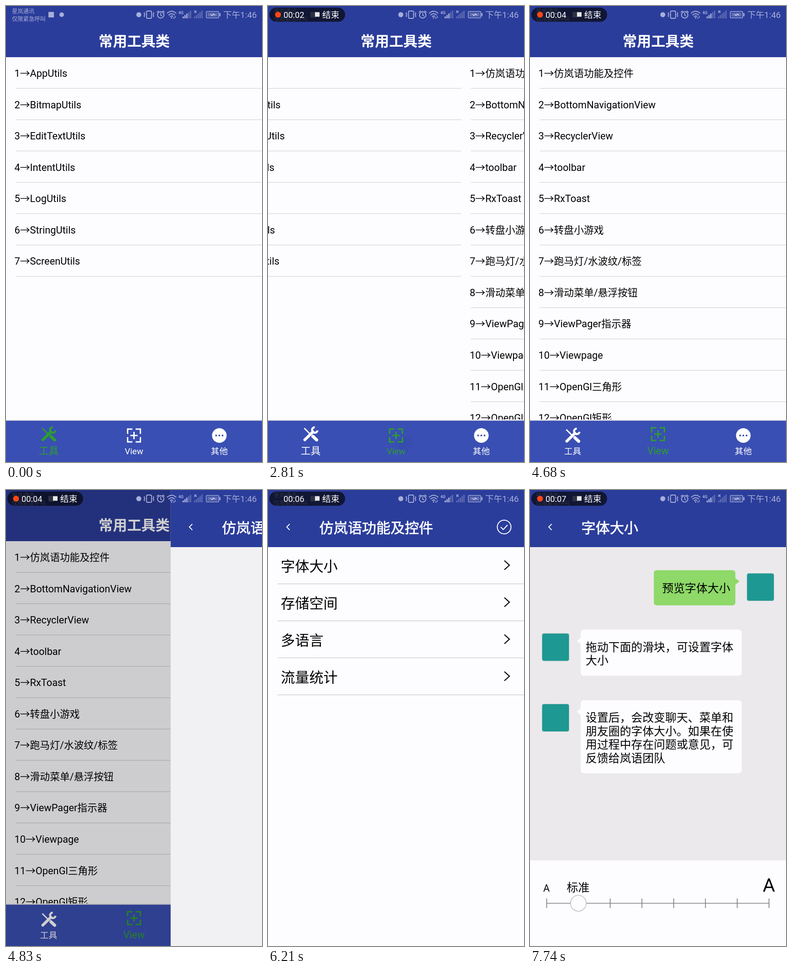
These frames come from a looping animation (561 by 998 pixels, 8 s). An HTML page:

```html
<!DOCTYPE html>
<html lang="zh-CN">
<head>
<meta charset="utf-8">
<title>常用工具类</title>
<style>
html, body { margin: 0; width: 100%; height: 100%; overflow: hidden; background: #fdfcff; }
svg { display: block; width: 100vw; height: 100vh; }
text { font-family: Roboto, "Noto Sans CJK SC", "Noto Sans CJK", sans-serif; white-space: pre; }
</style>
</head>
<body>
<svg id="stage" viewBox="0 0 561 998"></svg>
<script>
const W = 561, H = 998, LOOP = 8000;
const INDIGO = '#2b3d9b', NAV = '#3a4fb3', GREEN = '#2b9f2d', PAPER = '#fdfcff', DIM_ICON = '#a8afd8';

// Markup helpers
const rect = (x, y, w, h, fill, more = '') =>
  `<rect x="${x}" y="${y}" width="${w}" height="${h}" fill="${fill}" ${more}/>`;
const circle = (x, y, r, fill, more = '') => `<circle cx="${x}" cy="${y}" r="${r}" fill="${fill}" ${more}/>`;
const line = (d, color, width, more = '') =>
  `<path d="${d}" fill="none" stroke="${color}" stroke-width="${width}" ${more}/>`;
const text = (x, y, size, str, more = '') => `<text x="${x}" y="${y}" font-size="${size}" ${more}>${str}</text>`;
const group = (id, body, more = '') => `<g id="${id}" ${more}>${body}</g>`;
const mid = 'text-anchor="middle"';

// Home screen
const tools = ['App', 'Bitmap', 'EditText', 'Intent', 'Log', 'String', 'Screen'].map(s => s + 'Utils');
const views = ['仿岚语功能及控件', 'BottomNavigationView', 'RecyclerView', 'toolbar', 'RxToast', '转盘小游戏',
  '跑马灯/水波纹/标签', '滑动菜单/悬浮按钮', 'ViewPager指示器', 'Viewpage', 'OpenGl三角形', 'OpenGl矩形'];

const list = (items, x0) => items.map((s, i) => {
  const y = 112 + 68.56 * i;
  return text(x0 + 18.5, y + 43, 21.8, `${i + 1}→${s}`) + rect(x0 + 21, y + 67.6, W - 21, 1.4, '#d9d8d8');
}).join('');

const icons = [
  line('M-14 -13L1 2', 'currentColor', 3) + line('M5 5L13 12.5', 'currentColor', 7, 'stroke-linecap="round"') +
  line('M-13 12.5L5 -5', 'currentColor', 6, 'stroke-linecap="round"') +
  line('M9 -15A6 6 0 1 0 15 -8', 'currentColor', 4.5),
  line('M-3.5 -14H-14V-3.5M3.5 -14H14V-3.5M-3.5 14H-14V3.5M3.5 14H14V3.5', 'currentColor', 3) +
  line('M-8 0H8M0 -8V8', 'currentColor', 3),
  circle(0, 0, 16, 'currentColor') + [-7, 0, 7].map(x => circle(x, 0, 2, NAV)).join('')
];

const tabs = ['工具', 'View', '其他'].map((name, i) => group('tab' + i,
  group('icon' + i, icons[i]) + text(93.5 + 187 * i, 980.7, 18.7, name, `id="label${i}" fill="currentColor" ${mid}`)
)).join('');

const home = rect(0, 0, W, H, PAPER) +
  group('pager', list(tools, 0) + list(views, W)) +
  rect(0, 0, W, 112, INDIGO) +
  text(281, 88, 31.2, '常用工具类', `fill="#fff" font-weight="700" ${mid}`) +
  rect(0, 905, W, 3, '#f0eeec') + rect(0, 907.5, W, 91, NAV) +
  circle(300, 958, 0, '#101c70', 'id="ripple"') + tabs;

// Inner screens
const bar = title => rect(0, 0, W, 125, INDIGO) +
  line('M47.5 74.5L41 81L47.5 87.5', '#fff', 1.8) +
  text(112.5, 94, 31.2, title, 'fill="#fff" stroke="#fff" stroke-width=".7"');

const features = rect(0, 0, W, H, '#f1f0f2') +
  group('rows', rect(0, 125, W, H, PAPER) + ['字体大小', '存储空间', '多语言', '流量统计'].map((s, i) => {
    const y = 125 + 81 * i;
    return text(28, y + 52.5, 31.2, s) + rect(21, y + 79.7, W, 1.4, '#cfcecf') +
      line(`M518 ${y + 29.5}L529 ${y + 39.5}L518 ${y + 49.5}`, '#000', 2.2);
  }).join('')) +
  bar('仿岚语功能及控件') +
  circle(517.5, 81, 15, 'none', 'stroke="#fff" stroke-width="2"') +
  line('M510 81L515.5 86.5L525 76.5', '#fff', 2);

const avatar = (x, y) => rect(x + 0.5, y + 0.5, 59, 60, '#1d9892', 'rx="4" stroke="#8fb9b3"');
const lines = (x, y, arr) => arr.map((s, i) => text(x, y + 29.7 * i, 24.9, s)).join('');
const bubble = (y, h, arr) => avatar(26, y + 8) + rect(111, y, 353, h, PAPER, 'rx="7"') +
  `<path d="M112 ${y + 17}L103 ${y + 25}L112 ${y + 33}Z" fill="${PAPER}"/>` + lines(122, y + 47, arr);

let ticks = 'M36 904.5H524';
for (let i = 0; i < 8; i++) ticks += `M${36.5 + 69.6 * i} 894V915`;

const fontSize = rect(0, 0, W, H, '#ebe9ec') + bar('字体大小') +
  rect(271.5, 175.5, 178.5, 77, '#8ed968', 'rx="6"') + '<path d="M449 192L459 200L449 208Z" fill="#8ed968"/>' +
  lines(289.5, 224, ['预览字体大小']) + avatar(475, 182) +
  bubble(305.5, 101, ['拖动下面的滑块，可设置字体', '大小']) +
  bubble(460, 160, ['设置后，会改变聊天、菜单和', '朋友圈的字体大小。如果在使', '用过程中存在问题或意见，可', '反馈给岚语团队']) +
  rect(0, 810.5, W, 188, PAPER) + line(ticks, '#7f7d82', 1.7) +
  circle(106, 904.5, 17.3, PAPER, 'stroke="#b4b3b6" stroke-width="1.3"') +
  text(36, 878.7, 21.8, 'A', mid) + text(105.5, 879, 24.9, '标准', mid) + text(523.5, 878.5, 41.5, 'A', mid);

// Status bar
const bars = (x, lit) => [0, 1, 2, 3, 4].map(i =>
  rect(x + 4 * i, 23 - 3.2 * i, 2.8, 4 + 3.2 * i, DIM_ICON, i < lit ? '' : 'opacity=".4"')).join('');
const status = text(13, 15.5, 12.3, '星岚通讯') + text(13, 32.5, 12.3, '仅限紧急呼叫') +
  rect(93, 13, 12, 12, DIM_ICON) + circle(122, 19, 5, DIM_ICON) + circle(291, 19, 5.5, DIM_ICON) +
  rect(308, 11, 11, 16, 'none', `rx="2" stroke="${DIM_ICON}" stroke-width="1.8"`) +
  line('M304 14l-1.5 2.5l2 2.5l-2 2.5l1.5 2.5M322.5 14l1.5 2.5l-2 2.5l2 2.5l-1.5 2.5', DIM_ICON, 1.7) +
  circle(339, 19.5, 7, 'none', `stroke="${DIM_ICON}" stroke-width="1.9"`) +
  line('M339 15V20L342 22M330.5 14L335 10.5M347.5 14L343 10.5', DIM_ICON, 1.7) +
  line('M353 16Q363 7 373 16M356 20Q363 13.5 370 20M359.5 23.5Q363 20.5 366 23', DIM_ICON, 2) +
  circle(363, 26, 1.6, DIM_ICON) + line('M368 24v4M371 22v4', DIM_ICON, 1.5) +
  text(378, 17.5, 8.5, '4G', 'font-weight="700"') + bars(387, 3) +
  line('M412.5 10l5 5m0 -5l-5 5', DIM_ICON, 1.7) + bars(412, 0) +
  rect(439, 12, 27, 14, 'none', `rx="1.5" stroke="${DIM_ICON}" stroke-width="1.5"`) +
  rect(441.5, 14.5, 22, 9, DIM_ICON, 'opacity=".4"') + rect(467.5, 15.5, 2.5, 7, DIM_ICON) +
  '<path d="M446 17.5L454 20L453 16L460 20.5L452 19L453 22.5Z" fill="#e4e7f8"/>' +
  text(476, 26, 18.7, '下午1:46');

const pill = rect(3, 3.5, 166, 31, '#080a14', 'rx="15.5" opacity=".76"') +
  circle(22, 19, 6.5, '#ff4716', 'id="dot"') +
  text(34, 26, 18.3, '00:00', 'id="clock"') + rect(103, 13.5, 10, 10, '#e8e8ea') + text(119, 26, 18.7, '结束');

const shade = id => rect(0, 0, W, H, '#000', `id="${id}" opacity="0"`);
const $ = id => document.getElementById(id);
$('stage').innerHTML = home + shade('shade1') + group('features', features) +
  shade('shade2') + group('fontSize', fontSize) +
  group('status', status, `fill="${DIM_ICON}"`) + group('pill', pill, 'fill="#fff"');

// Motion
const part = (t, start, length) => Math.min(1, Math.max(0, (t - start) / length));
const smooth = x => x * x * (3 - 2 * x);
const easeOut = x => 1 - (1 - x) ** 3;
const set = (id, name, value) => $(id).setAttribute(name, value);
const shift = (id, x, y = 0) => set(id, 'transform', `translate(${x} ${y})`);

function setTab(i, size, on) {
  shift('icon' + i, 93.5 + 187 * i, 940 - 3 * size);
  set('label' + i, 'font-size', 18.7 + 3.1 * size);
  set('tab' + i, 'color', on ? GREEN : '#fff');
}

function openScreen(t, id, shadeId, start) {
  const p = smooth(part(t, start, 300));
  shift(id, W * (1 - p));
  set(shadeId, 'opacity', 0.54 * p);
}

function draw(t) {
  const picked = t >= 2785, grow = smooth(part(t, 2820, 120));
  shift('pager', -W * easeOut(part(t, 2781.5, 330)));
  setTab(0, 1 - grow, !picked);
  setTab(1, grow, picked);
  setTab(2, 0, false);
  set('ripple', 'r', 34 * part(t, 2720, 200));
  set('ripple', 'opacity', 0.07 * (1 - part(t, 2780, 220)));

  openScreen(t, 'features', 'shade1', 4710);
  shift('rows', W * (1 - easeOut(part(t, 4931, 355))));
  openScreen(t, 'fontSize', 'shade2', 7076.5);

  set('pill', 'opacity', part(t, 40, 200));
  set('dot', 'opacity', t >= 590 && Math.floor((t - 590) / 502) % 2 === 0 ? 1 : 0);
  $('clock').textContent = '00:0' + Math.max(0, Math.floor((t - 180) / 1000));
}

const begin = performance.now();
function frame() {
  draw((performance.now() - begin) % LOOP);
  requestAnimationFrame(frame);
}
frame();
</script>
</body>
</html>
```
